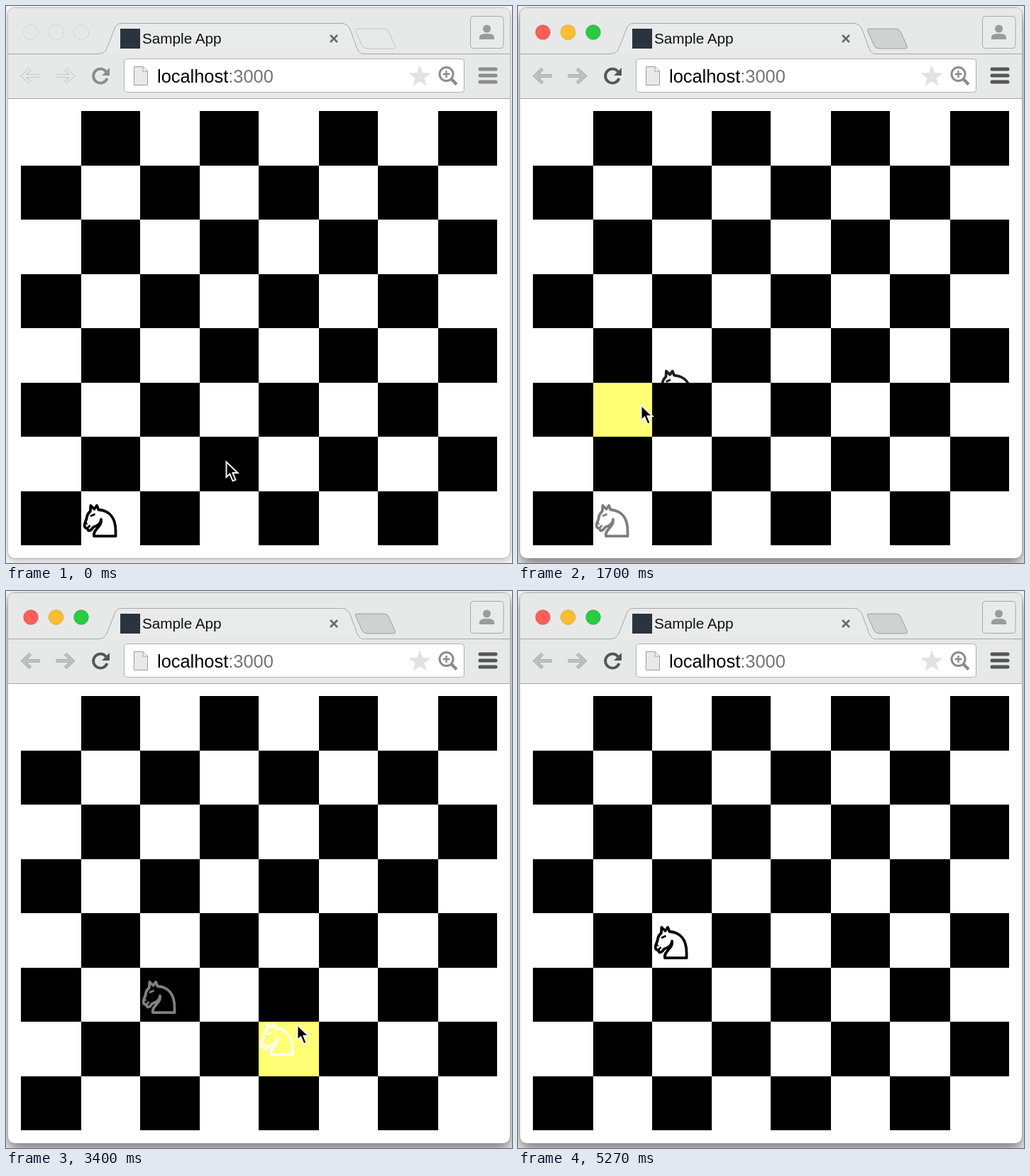
An HTML page that plays this animation: 713x785 px, repeating every 5.61 s.

```html
<!DOCTYPE html>
<html lang="en">
<head>
<meta charset="utf-8">
<title>Sample App</title>
<style>
html, body { margin: 0; width: 100%; height: 100%; overflow: hidden; background: #f4f4f4; }
#win { position: absolute; left: 3px; top: 3px; width: 707px; height: 775px; border-radius: 9px;
  background: #fff; box-shadow: 0 0 1px 1px #bbb, 0 4px 10px rgba(0,0,0,.2); }
.on #win { box-shadow: 0 0 1px 1px #aaa, 0 9px 18px rgba(0,0,0,.5); }
svg { position: absolute; left: 0; top: 0; display: block; }
text { font-family: "Liberation Sans", Arial, sans-serif; }
.line { fill: none; stroke: #a6a8a7; }
.light { fill: none; stroke: #c4c6c5; stroke-dasharray: 2 1.5; }
.on .light { fill: var(--c); stroke: rgba(0,0,0,.12); stroke-dasharray: none; }
.plus { fill: #e8eae9; stroke: #c2c4c3; }
.on .plus { fill: #d0d1d1; stroke: #9b9d9c; }
.nav { fill: none; stroke-linejoin: miter; }
.rim { stroke: #c6c8c7; stroke-width: 5; }
.core { stroke: #e8eae9; stroke-width: 3; }
.on .rim { stroke: #acaead; }
.on .core { stroke: #c0c2c1; }
.tool { color: #8c8c8c; }
.on .tool { color: #565656; }
</style>
</head>
<body>
<div id="win"></div>
<svg width="713" height="785" viewBox="0 0 713 785">
  <defs>
    <g id="knight" fill="none" stroke="currentColor" stroke-width="3.8" stroke-linejoin="round">
      <path d="M15.5 46.2H46V39C46 20 37 10 22 9L19.5 3L16 8L10.8 3L10.3 11C7 14 5.5 17 5.2 21L2.4 29C1.6 33 3 35 5.5 35L8 38.3C11.5 39 12.5 35.5 14.5 33.5C20.5 31.5 25.5 29 25.5 22.5C27 34 13.5 36 15.5 46.2Z"/>
      <path stroke-width="3" d="M10.500 18L17 15M6 35L10 31M4.500 29L6 28"/>
    </g>
    <path id="arrow" d="M34.500 88.500L24 98.500L34.500 108.500M25 98.500H48"/>
    <g id="back"><use href="#arrow" class="rim"/><use href="#arrow" class="core"/></g>
    <path id="tab" d="M3 67.500H130C140 67 141 62 144 55L153 32C155 26 158 24.500 164 24.500H472C478 24.500 482 27 485 33L494 58C497 65 499 67.500 504 67.500H710"/>
  </defs>

  <path fill="#e7e9e8" d="M3 130V12Q3 3 12 3H701Q710 3 710 12V130Z"/>
  <use href="#tab" fill="#e9ebea"/>
  <g class="line"><use href="#tab"/><path d="M3 130.500H710"/></g>
  <circle class="light" style="--c:#fd5f58" cx="35" cy="37" r="10.5"/>
  <circle class="light" style="--c:#fdbd30" cx="70.5" cy="37" r="10.5"/>
  <circle class="light" style="--c:#28cc42" cx="106" cy="37" r="10.5"/>
  <path class="plus" d="M496 32H532Q537 32 539 36L548 56Q550 60 545 60H509Q504 60 502 56L493 36Q491 32 496 32Z"/>
  <rect x="161" y="32" width="28" height="28" fill="#2b343c"/>
  <text x="192" y="53" font-size="20.7" fill="#111">Sample App</text>
  <path d="M457 41L467 51M467 41L457 51" stroke="#6a6a6a" stroke-width="2.7"/>
  <rect x="654.5" y="14.5" width="46.500" height="45" rx="4" fill="#e9ebea" stroke="#a8aaa9"/>
  <g fill="#9a9c9b"><circle cx="677.5" cy="32" r="5.5"/><path d="M667 47V44Q667 39 677.500 39T688 44V47Z"/></g>

  <g class="nav"><use href="#back"/><use href="#back" transform="matrix(-1 0 0 1 118 0)"/></g>
  <g class="tool">
    <path fill="none" stroke="currentColor" stroke-width="3.8" d="M141 92.500A10 10 0 1 0 142.500 102"/>
    <path fill="currentColor" d="M146 87V98H135Z"/>
    <path stroke="currentColor" stroke-width="5" stroke-linecap="round" d="M668 89H690M668 98H690M668 107H690"/>
  </g>
  <rect x="166.5" y="74.5" width="479" height="47" rx="4" fill="#fff" stroke="#adafae"/>
  <path fill="#e9e9e9" stroke="#9c9c9c" d="M180.500 85.500H193L199.500 92V111.500H180.500ZM193 85.500V92H199.500"/>
  <text x="213" y="107.5" font-size="25.4" fill="#000">localhost<tspan fill="#757575">:3000</tspan></text>
  <path id="star" fill="#e0e2e3"/>
  <g fill="none" stroke="#8b8b8b">
    <circle cx="620.5" cy="96" r="9.5" stroke-width="3"/>
    <path stroke-width="2.4" d="M615.500 96H625.500M620.500 91V101"/>
    <path stroke-width="4.5" d="M627.500 103L635 110.500"/>
  </g>

  <path id="board"/>
  <use id="piece" href="#knight"/>
  <path id="hover" fill="#fffd00" fill-opacity=".54"/>
  <use id="ghost" href="#knight" opacity=".87"/>
  <path id="cursor" d="M1.500 2.500V24L6.300 19.500L10.500 29.300L14.500 27.600L10.500 18H17.500Z" stroke="#f4f4f4" stroke-width="2"/>
</svg>
<script>
const $ = id => document.getElementById(id);
const STEP = 170, STEPS = 33, LAG = .4;

// Board edges: even columns are a little wider than odd ones
const edgeX = i => Math.round(21 + 83.85 * i + .9 * (i % 2));
const edgeY = i => Math.round(148 + 76.5 * i);

// Key points of the pointer: step, x, y
const path = [
  [0, 309, 640], [2, 127, 740], [8, 395, 513], [10, 172, 560], [13, 250, 569],
  [14, 242, 569], [15, 501, 643], [16, 461, 568], [18, 420, 430], [19, 406, 657],
  [20, 409, 609], [21, 485, 580], [24, 485, 580], [27, 222, 517], [29, 217, 514],
  [30, 366, 745], [STEPS, 309, 640]
];
// Steps of each press and release
const drags = [[2, 13], [14, 21], [24, 29]];

function pointer(step) {
  const i = Math.max(1, path.findIndex(p => p[0] >= step));
  const [s, x, y] = path[i - 1], [t, x2, y2] = path[i];
  const u = (step - s) / (t - s);
  return [x + (x2 - x) * u, y + (y2 - y) * u];
}

function cellAt([x, y]) {
  let col = 0, row = 0;
  while (col < 7 && edgeX(col + 1) <= x) col++;
  while (row < 7 && edgeY(row + 1) <= y) row++;
  return [col, row];
}

const isBlack = ([col, row]) => (col + row) % 2 === 1;
const square = ([col, row]) =>
  `M${edgeX(col)} ${edgeY(row)}H${edgeX(col + 1)}V${edgeY(row + 1)}H${edgeX(col)}Z`;
const place = (el, x, y) => el.setAttribute("transform", `translate(${x} ${y})`);
const show = (el, on) => el.style.display = on ? "" : "none";

const cells = Array.from({ length: 64 }, (_, i) => [i % 8, i >> 3]);
$("board").setAttribute("d", cells.filter(isBlack).map(square).join(""));

const tips = Array.from({ length: 10 }, (_, i) => {
  const a = i * Math.PI / 5, r = i % 2 ? 6.8 : 16.5;
  return [583 + r * Math.sin(a), 99.5 - r * Math.cos(a)];
});
$("star").setAttribute("d", "M" + tips.join("L") + "Z");

function draw(step) {
  const released = drags.filter(d => step >= d[1]);
  const cell = released.length ? cellAt(pointer(released.at(-1)[1])) : [1, 7];
  const drag = drags.find(([press, release]) => step > press && step < release);
  const home = [edgeX(cell[0]) + 2.5, edgeY(cell[1]) + 17];
  const [x, y] = pointer(step);

  document.body.className = step >= path[1][0] ? "on" : "";
  $("piece").style.color = $("ghost").style.color = isBlack(cell) ? "#fff" : "#000";
  $("piece").style.opacity = drag ? .5 : 1;
  place($("piece"), ...home);

  show($("ghost"), drag);
  show($("hover"), drag);
  if (drag) {
    // The dragged image trails the pointer, keeping the grip it was taken with
    const grip = pointer(drag[0]), late = pointer(step - LAG);
    place($("ghost"), ...home.map((h, i) => h + late[i] - grip[i]));
    $("hover").setAttribute("d", square(cellAt([x, y])));
  }
  show($("cursor"), step < 31);
  place($("cursor"), x, y);
}

const start = performance.now();
function tick() {
  draw(Math.floor((performance.now() - start) / STEP) % STEPS);
  requestAnimationFrame(tick);
}
tick();
</script>
</body>
</html>
```
